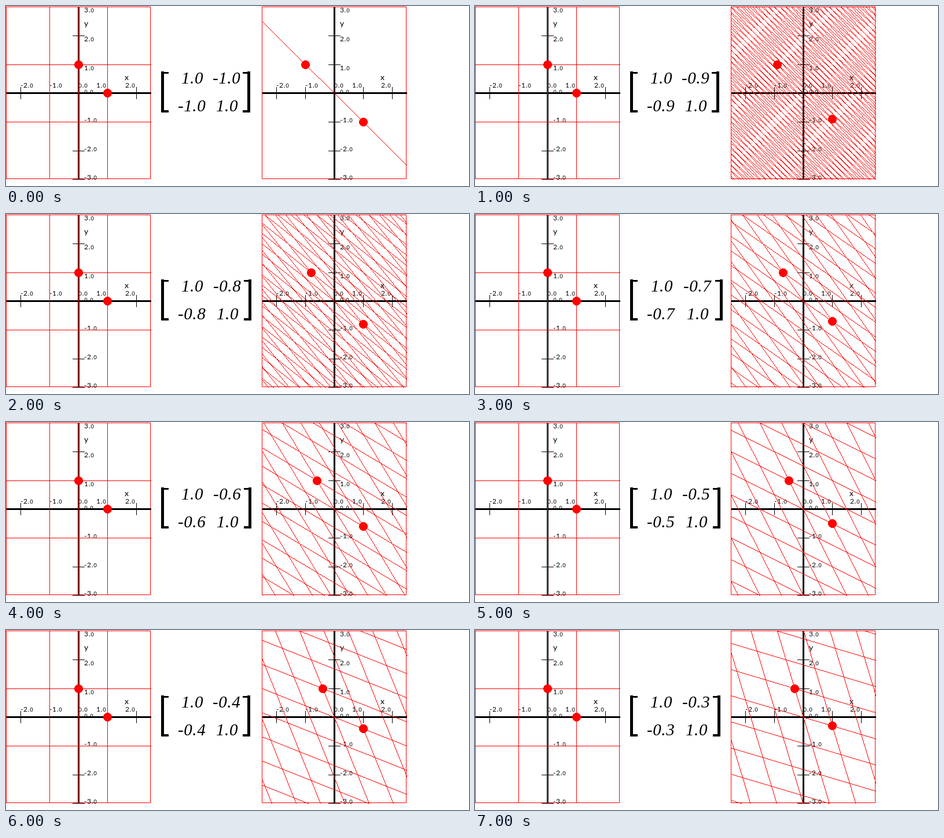
Write an HTML page with a canvas that moves like this. It is 800 by 311 pixels and loops after 8 s.

```html
<!DOCTYPE html>
<html lang="en">
<head>
<meta charset="utf-8">
<title>Matrix mapping of a grid</title>
<style>
  html, body { margin: 0; width: 100%; height: 100%; overflow: hidden; background: #fff; }
  svg, canvas { position: absolute; left: 0; top: 0; width: 800px; height: 311px; }
  .label { font: 12px Lato, "Open Sans", sans-serif; letter-spacing: .6px; }
  .zero { font: 9.5px "DejaVu Sans", sans-serif; }
  .axis { font: 14px Lato, "Open Sans", sans-serif; }
  .entry { font: italic 29px "Liberation Serif", serif; letter-spacing: .6px; }
  rect, .bracket { shape-rendering: crispEdges; }
</style>
</head>
<body>
<svg id="base" viewBox="0 0 800 311"></svg>
<canvas id="grid" width="800" height="311"></canvas>
<script>
const STEP = 1000, COUNT = 8;
const UX = 50, UY = 149 / 3, CY = 150.33, TOP = 1, BOTTOM = 299;
const LEFT = 0, RIGHT = 442, HALF = 125;
const RED = '#f00';
// Column shift caused by the differing widths of the digits
const SHIFTS = [0, 0, 1, 3, 1, 1, 0, 1];

const svg = document.getElementById('base');
const ctx = document.getElementById('grid').getContext('2d');
const toY = y => Math.round(CY - y * UY);

function add(tag, attrs, parent = svg) {
  const el = document.createElementNS('http://www.w3.org/2000/svg', tag);
  for (const key in attrs) el.setAttribute(key, attrs[key]);
  return parent.appendChild(el);
}

function box(x, y, width, height, fill = '#000') {
  add('rect', { x, y, width, height, fill });
}

function text(x, y, str, cls) {
  const el = add('text', { x, y, class: cls });
  el.textContent = str;
  return el;
}

function label(x, y, value) {
  const el = text(x, y, '', 'label');
  for (const ch of value.toFixed(1)) {
    add('tspan', ch === '0' ? { class: 'zero' } : {}, el).textContent = ch;
  }
}

function axes(x0) {
  const cx = x0 + HALF;
  box(x0, TOP, 250, 1, RED);
  box(x0, 298, 250, 1, RED);
  box(x0, TOP, 1, 298, RED);
  box(x0 + 249, TOP, 1, 298, RED);
  box(cx - 1, TOP + 1, 3, 298);
  box(x0 + 1, toY(0) - 1, 250, 3);
  for (let k = -3; k <= 3; k++) {
    const y = toY(k);
    if (k && k < 3) box(cx - 10, y, 21, 1);
    label(cx + 10, y + (k > 0 ? 10 : k ? 1 : 2), k);
    if (Math.abs(k) < 3) {
      if (k) box(cx + k * UX, 140, 1, 21);
      label(cx + k * UX - (k > 0 ? 19 : 0), 141, k);
    }
  }
  text(cx + 10, 35, 'y', 'axis');
  text(cx + 80, 128, 'x', 'axis');
}

axes(LEFT);
axes(RIGHT);
add('path', { class: 'bracket', d: 'M268 113h5v1h8v3h-8v63h8v4h-13z' });
const close = add('path', { class: 'bracket', d: 'M422 113h-5v1h-8v3h8v63h-8v4h13z' });
const m11 = text(303, 134, '1.0', 'entry');
const m12 = text(357, 134, '', 'entry');
const m21 = text(297, 182, '', 'entry');
const m22 = text(363, 182, '1.0', 'entry');

// Disc made of whole-pixel rows
function dot(x0, x, y) {
  const px = Math.round(x0 + HALF + x * UX), py = toY(y);
  for (let dy = -7; dy <= 7; dy++) {
    const w = Math.floor(Math.sqrt(56 - dy * dy));
    ctx.fillRect(px - w, py + dy, 2 * w + 1, 1);
  }
}

function plainGrid() {
  for (let k = -1; k <= 1; k++) {
    ctx.fillRect(HALF + k * UX, TOP, 1, 298);
    if (k) ctx.fillRect(0, toY(k), 251, 1);
  }
  dot(LEFT, 1, 0);
  dot(LEFT, 0, 1);
}

// Images of the lines x = k and y = k, one pixel per row or column
function mappedGrid(a) {
  const gap = 1 - a * a, cx = RIGHT + HALF;
  const reach = gap ? Math.ceil(5.5 / gap) : 0;
  ctx.save();
  ctx.beginPath();
  ctx.rect(RIGHT, TOP, 251, 299);
  ctx.clip();
  for (let k = -reach; k <= reach; k++) {
    for (let py = TOP; py <= BOTTOM; py++) {
      const y = (CY - py) / UY;
      ctx.fillRect(Math.round(cx + (k * gap - a * y) * UX), py, 1, 1);
    }
    for (let px = RIGHT; px <= RIGHT + 250; px++) {
      const x = (px - cx) / UX;
      ctx.fillRect(px, toY(k * gap - a * x), 1, 1);
    }
  }
  ctx.restore();
  dot(RIGHT, 1, -a);
  dot(RIGHT, -a, 1);
}

function draw(i) {
  const a = (10 - i) / 10, shift = SHIFTS[i];
  m12.textContent = m21.textContent = (-a).toFixed(1);
  m11.setAttribute('x', 303 + (shift > 1 ? 1 : 0));
  m12.setAttribute('x', 357 + shift);
  m22.setAttribute('x', 363 + shift);
  close.setAttribute('transform', `translate(${shift * 2} 0)`);
  ctx.clearRect(0, 0, 800, 311);
  ctx.fillStyle = RED;
  plainGrid();
  mappedGrid(a);
}

let shown = -1;
const start = performance.now();
function tick() {
  const i = Math.floor((performance.now() - start) / STEP) % COUNT;
  if (i !== shown) draw(shown = i);
  requestAnimationFrame(tick);
}
tick();
</script>
</body>
</html>
```
